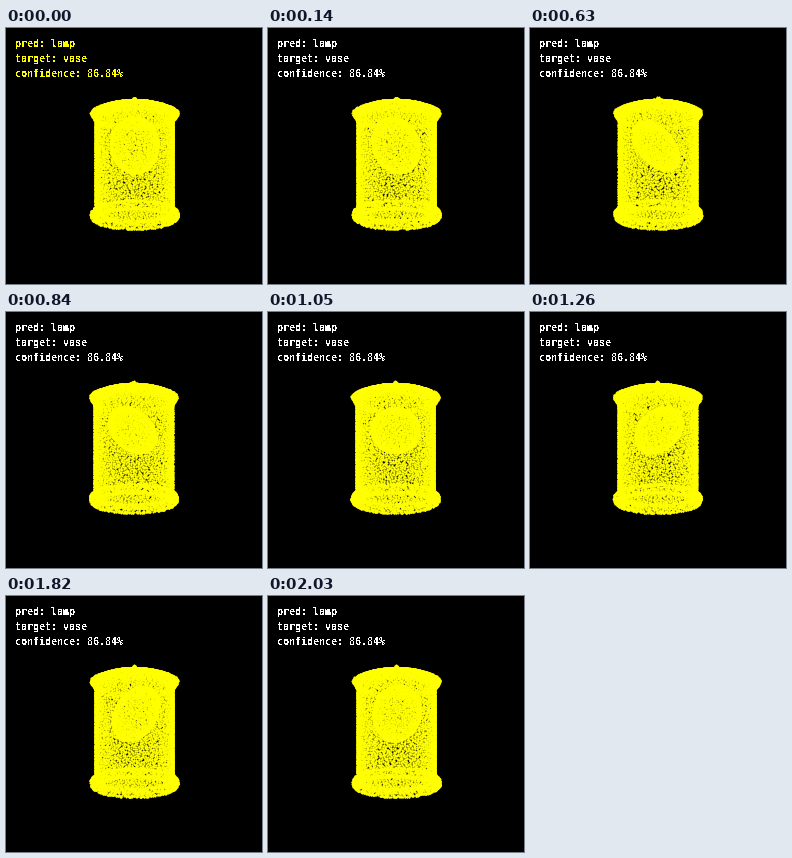
Recreate the animation shown at these times as a matplotlib script. Size 256 by 256 pixels, loop 2.1 s.

```python
import numpy as np
import matplotlib.pyplot as plt
from matplotlib.animation import FuncAnimation

SIZE, DPI = 256, 64
FRAMES, STEP_MS = 30, 70
PX = 72 / DPI
GOLDEN = (5 ** 0.5 - 1) / 2
SIN_E = 0.25          # camera elevation
CX = 127.8
YELLOW = "#ffff00"

rng = np.random.default_rng(4)


def spread(n):
    """Evenly scattered pairs (angle, 0..1) with a little jitter."""
    i = np.arange(n)
    turn = 2 * np.pi * (i * GOLDEN % 1) + rng.normal(0, 0.018, n)
    return turn, np.clip((i + 0.5) / n + rng.normal(0, 0.004, n), 0, 1)


def ring(turn, radius, level):
    """Points around the axis; level is the screen row of the axis point."""
    return np.column_stack([radius * np.cos(turn),
                            level + 0 * turn,
                            radius * np.sin(turn)])


def wall(n, r0, r1, y0, y1):
    t, u = spread(n)
    return ring(t, r0 + (r1 - r0) * u, y0 + (y1 - y0) * u)


def dome(n, radius, height, y):
    t, u = spread(n)
    return ring(t, radius * np.sqrt(u), y - height * (1 - u))


def torus(n, radius, tube_r, tube_y, y):
    t, u = spread(n)
    v = 2 * np.pi * (u * 89 % 1)
    return ring(t, radius + tube_r * np.cos(v), y + tube_y * np.sin(v))


def blob(n, wide, long, thick, tilt):
    """Flattened ellipsoid whose top leans away from the viewer."""
    t, u = spread(n)
    h = 2 * u - 1
    s = np.sqrt(1 - h ** 2)
    x, a, b = wide * s * np.cos(t), long * s * np.sin(t), thick * h
    c, d = np.cos(tilt), np.sin(tilt)
    return np.column_stack([x, 117.5 - (a * c + b * d), -2 - a * d + b * c])


cloud = np.vstack([
    wall(5000, 39.2, 39.2, 86, 183),
    wall(420, 44, 39.2, 85, 92),
    dome(1500, 44, 10, 84.5),
    torus(1700, 40, 4, 4.5, 186.5),
    dome(350, 38, 0, 188),
    wall(24, 1.5, 1, 72, 69.5),
    blob(1300, 24, 29, 17, np.radians(40)),
])
cloud[:, 0] += 0.5


def project(angle):
    x, y, z = cloud.T
    c, s = np.cos(angle), np.sin(angle)
    return CX + x * c + z * s, y + (z * c - x * s) * SIN_E


fig = plt.figure(figsize=(SIZE / DPI, SIZE / DPI), dpi=DPI, facecolor="black")
ax = fig.add_axes([0, 0, 1, 1])
ax.set(xlim=(0, SIZE), ylim=(SIZE, 0))
ax.axis("off")

dots, = ax.plot([], [], "o", ms=2.1 * PX, mew=0, color=YELLOW)
lines = ["pred: lamp", "target: vase", "confidence: 86.84%"]
labels = [ax.text(9.2, 19 + 15 * k, line, family="DejaVu Sans Mono",
                  weight="bold", size=10 * PX, va="baseline",
                  antialiased=False)
          for k, line in enumerate(lines)]


def update(i):
    dots.set_data(*project(2 * np.pi * i / FRAMES))
    for label in labels:
        label.set_color(YELLOW if i == 0 else "white")
    return [dots, *labels]


anim = FuncAnimation(fig, update, frames=FRAMES, interval=STEP_MS,
                     repeat=True, repeat_delay=0)
plt.show()
```
